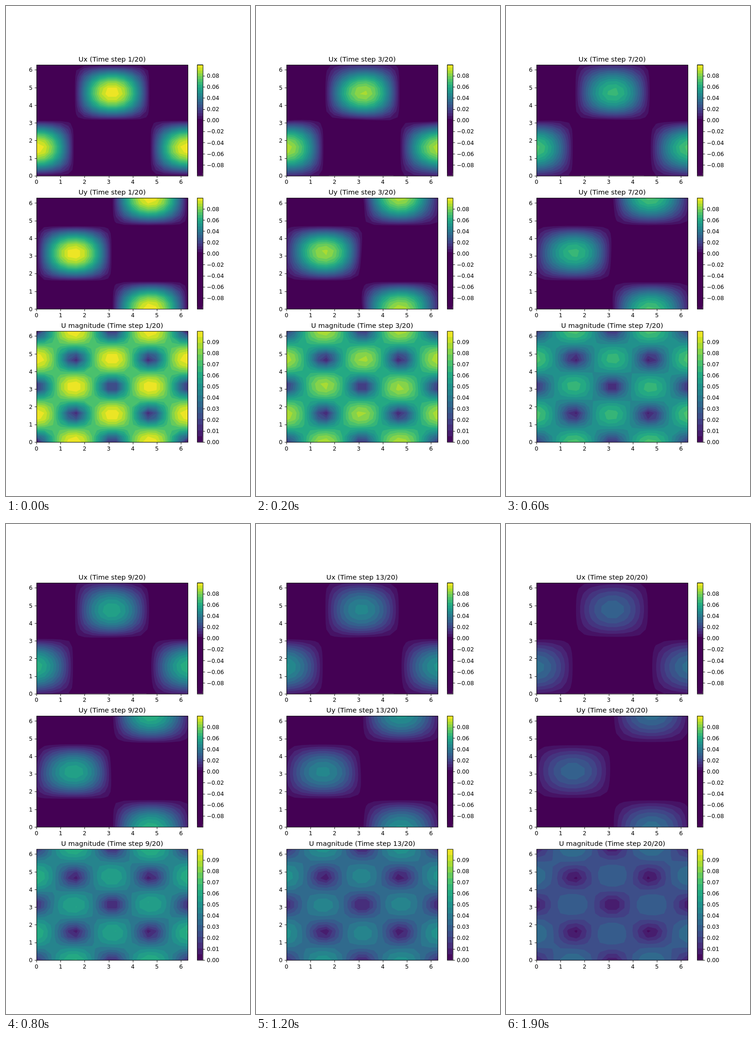
An HTML page with a canvas for the animation above (2000 ms loop, 529 by 1058 pixels).

```html
<!DOCTYPE html>
<html lang="en">
<head>
<meta charset="utf-8">
<title>Decaying vortices</title>
<style>
  html, body { margin: 0; width: 529px; height: 1058px; overflow: hidden; background: #fff; }
  canvas, svg { position: absolute; left: 0; top: 0; width: 529px; height: 1058px; }
  text { font-family: "DejaVu Sans", sans-serif; font-size: 13.89px; fill: #000; }
  .title { font-size: 16.67px; text-anchor: middle; }
  .line { fill: none; stroke: #000; stroke-width: 1.11; }
</style>
</head>
<body>
<canvas id="field" width="529" height="1058"></canvas>
<svg id="axes" viewBox="0 0 600 1200" preserveAspectRatio="none"></svg>
<script>
const N = 20, STEPS = 20, STEP_MS = 100, SUBSTEPS = 10, LAST = 18;
const SPAN = 2 * Math.PI, OMEGA = 1.7, SPEED = 0.1;

// Layout in 600 x 1200 units
const LEFT = 75, WIDTH = 372, HEIGHT = 271.76, PITCH = 326.12, TOP = 144;
const BAR_X = 470.25, BAR_W = 13.6;

// Lattice Boltzmann flow on a periodic 20 x 20 grid
const DIRS = [];
for (let cx = -1; cx < 2; cx++)
  for (let cy = -1; cy < 2; cy++)
    DIRS.push({ cx, cy, w: [4 / 9, 1 / 9, 1 / 36][cx * cx + cy * cy] });

const grid = () => new Float64Array(N * N);
const wrap = i => (i + N) % N;

function equilibrium(d, rho, u, v) {
  const cu = 3 * (d.cx * u + d.cy * v);
  return d.w * rho * (1 + cu + cu * cu / 2 - 1.5 * (u * u + v * v));
}

function simulate() {
  const rho = grid().fill(1), ux = grid(), uy = grid(), states = [];
  for (let i = 0; i < N; i++)
    for (let j = 0; j < N; j++) {
      const x = i * SPAN / (N - 1), y = j * SPAN / (N - 1);
      ux[i * N + j] = SPEED * Math.cos(x) * Math.sin(y);
      uy[i * N + j] = -SPEED * Math.sin(x) * Math.cos(y);
    }
  let f = DIRS.map(d => rho.map((r, k) => equilibrium(d, r, ux[k], uy[k])));
  for (let t = 0; t <= LAST * SUBSTEPS; t++) {
    if (t % SUBSTEPS === 0)
      states.push([ux.slice(), uy.slice(), ux.map((u, k) => Math.hypot(u, uy[k]))]);
    f = DIRS.map((d, q) => {
      const next = grid();
      for (let i = 0; i < N; i++)
        for (let j = 0; j < N; j++) {
          const k = i * N + j;
          next[wrap(i + d.cx) * N + wrap(j + d.cy)] =
            f[q][k] + OMEGA * (equilibrium(d, rho[k], ux[k], uy[k]) - f[q][k]);
        }
      return next;
    });
    for (let k = 0; k < N * N; k++) {
      let r = 0, mx = 0, my = 0;
      DIRS.forEach((d, q) => { r += f[q][k]; mx += d.cx * f[q][k]; my += d.cy * f[q][k]; });
      rho[k] = r; ux[k] = mx / r; uy[k] = my / r;
    }
  }
  return states;
}

const states = simulate();
const peak = Math.max(...states[0][2]);

const STOPS = ["440154", "482475", "414487", "355f8d", "2a788e", "21918c",
  "22a884", "44bf70", "7ad151", "bddf26", "fde725"]
  .map(h => [0, 2, 4].map(i => parseInt(h.slice(i, i + 2), 16)));

function colour(value) {
  const p = Math.min(1, Math.max(0, value / peak)) * 10, i = Math.min(9, Math.floor(p));
  return `rgb(${STOPS[i].map((c, n) => Math.round(c + (STOPS[i + 1][n] - c) * (p - i)))})`;
}

const levels = (lo, hi, n) => Array.from({ length: n }, (_, i) => lo + (hi - lo) * i / (n - 1));
const panels = [
  { name: "Ux", levels: levels(-peak, peak, 40), tick: 0.02, first: -4, last: 4 },
  { name: "Uy", levels: levels(-peak, peak, 40), tick: 0.02, first: -4, last: 4 },
  { name: "U magnitude", levels: levels(0, peak, 20), tick: 0.01, first: 0, last: 9 }
];
panels.forEach((p, n) => { p.top = TOP + n * PITCH; });

// Axes, ticks and labels
const svg = document.getElementById("axes");
function add(tag, attrs, text = "") {
  const el = document.createElementNS("http://www.w3.org/2000/svg", tag);
  for (const key in attrs) el.setAttribute(key, attrs[key]);
  el.textContent = text;
  return svg.appendChild(el);
}
const snap = v => Math.round(v) + 0.5;
function frame(x, y, w, h) {
  const x0 = snap(x), y0 = snap(y);
  add("rect", { class: "line", x: x0, y: y0, width: snap(x + w) - x0, height: snap(y + h) - y0 });
}
const tickMark = d => add("path", { class: "line", d });

for (const p of panels) {
  const bottom = p.top + HEIGHT;
  for (let i = 0; i <= 6; i++) {
    const x = LEFT + WIDTH * i / SPAN, y = bottom - HEIGHT * i / SPAN;
    tickMark(`M${snap(x)} ${snap(bottom)}v4.86M${snap(LEFT)} ${snap(y)}h-4.86`);
    add("text", { x, y: bottom + 20.3, "text-anchor": "middle" }, i);
    add("text", { x: LEFT - 9.7, y: y + 5.3, "text-anchor": "end" }, i);
  }
  const lo = p.levels[0];
  for (let i = p.first; i <= p.last; i++) {
    const v = i * p.tick, y = bottom - HEIGHT * (v - lo) / (peak - lo);
    tickMark(`M${snap(BAR_X + BAR_W)} ${snap(y)}h4.86`);
    add("text", { x: BAR_X + BAR_W + 9.7, y: y + 5.3 }, v.toFixed(2).replace("-", "\u2212"));
  }
  frame(LEFT, p.top, WIDTH, HEIGHT);
  frame(BAR_X, p.top, BAR_W, HEIGHT);
  p.title = add("text", { class: "title", x: LEFT + WIDTH / 2, y: p.top - 8.3 });
}

// Filled contours
const ctx = document.getElementById("field").getContext("2d");
ctx.scale(529 / 600, 1058 / 1200);

function traceCell(corners, level) {
  const high = corners.map(c => c.z >= level);
  if (!high.includes(true)) return;
  const mean = corners.reduce((s, c) => s + c.z, 0) / 4;
  const split = high[0] === high[2] && high[1] === high[3] && high[0] !== high[1] && mean < level;
  const start = split && high[0] ? 1 : 0;
  let open = false;
  const point = (x, y) => { open ? ctx.lineTo(x, y) : ctx.moveTo(x, y); open = true; };
  for (let n = 0; n < 4; n++) {
    const i = (start + n) % 4, j = (i + 1) % 4, a = corners[i], b = corners[j];
    if (high[i]) point(a.x, a.y);
    if (high[i] !== high[j]) {
      const s = (level - a.z) / (b.z - a.z);
      point(a.x + (b.x - a.x) * s, a.y + (b.y - a.y) * s);
      if (split && high[i]) { ctx.closePath(); open = false; }
    }
  }
  if (open) ctx.closePath();
}

function drawField(p, z) {
  const node = (i, j) => ({
    x: LEFT + WIDTH * i / (N - 1),
    y: p.top + HEIGHT * (1 - j / (N - 1)),
    z: z[i * N + j]
  });
  for (let b = 0; b < p.levels.length - 1; b++) {
    const mid = (p.levels[b] + p.levels[b + 1]) / 2;
    ctx.fillStyle = colour(mid);
    const y = p.top + HEIGHT * (1 - b / (p.levels.length - 1));
    ctx.fillRect(BAR_X, p.top, BAR_W, y - p.top);
    if (b === 0) ctx.fillRect(LEFT, p.top, WIDTH, HEIGHT);
    if (b === 0 || mid < -1e-9) continue;
    ctx.beginPath();
    for (let i = 0; i < N - 1; i++)
      for (let j = 0; j < N - 1; j++)
        traceCell([node(i, j), node(i + 1, j), node(i + 1, j + 1), node(i, j + 1)], p.levels[b]);
    ctx.fill();
  }
}

let shown = -1;
function draw(step) {
  if (step === shown) return;
  shown = step;
  ctx.clearRect(0, 0, 600, 1200);
  panels.forEach((p, n) => {
    drawField(p, states[Math.min(step, LAST)][n]);
    p.title.textContent = `${p.name} (Time step ${step + 1}/${STEPS})`;
  });
}

const begin = performance.now();
function tick() {
  draw(Math.floor((performance.now() - begin) / STEP_MS) % STEPS);
  requestAnimationFrame(tick);
}
tick();
</script>
</body>
</html>
```
